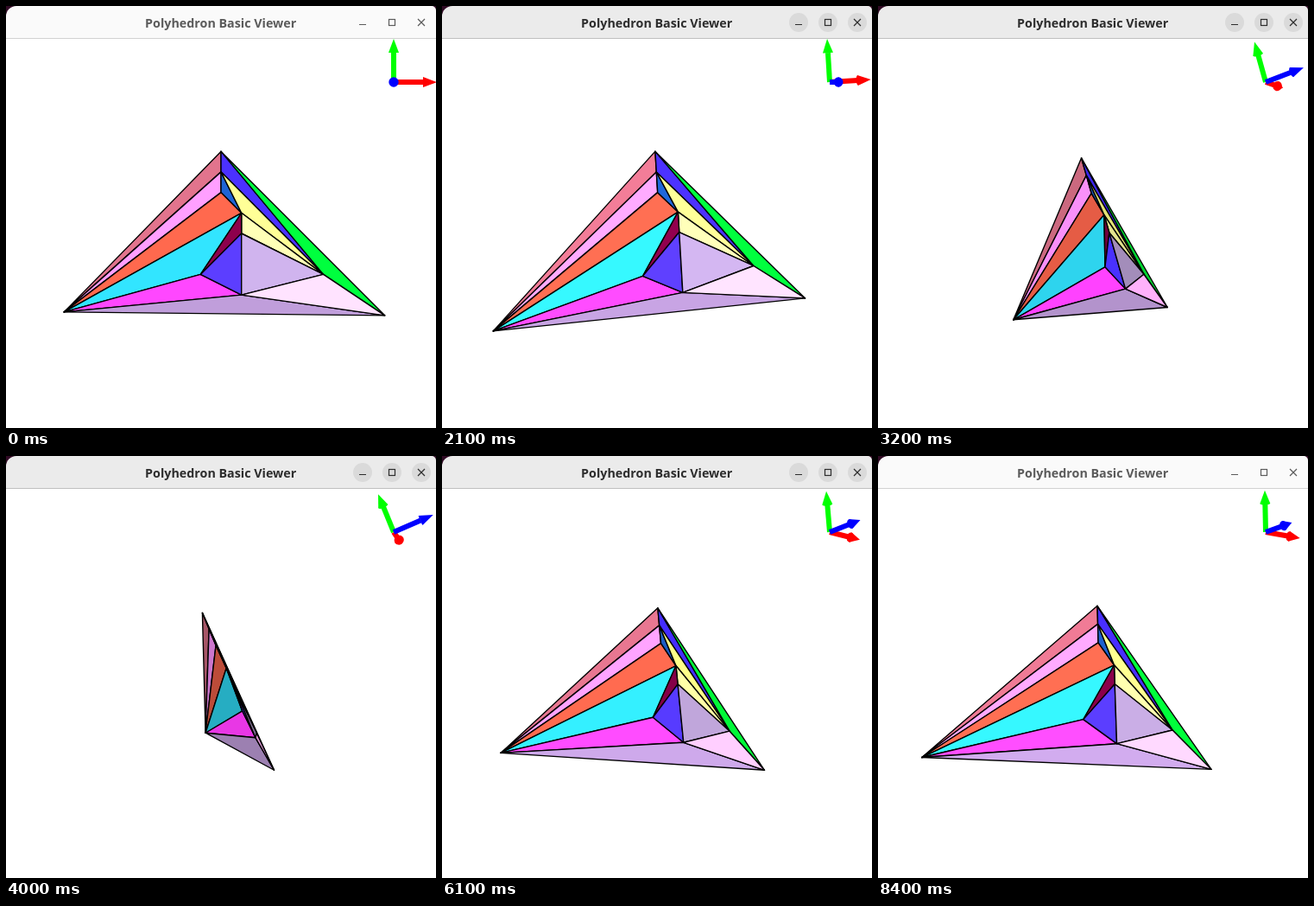
An HTML page with a canvas that plays this animation: 498x488 px, repeating every 8.5 s.

```html
<!DOCTYPE html>
<html lang="en">
<head>
<meta charset="utf-8">
<title>Polyhedron Basic Viewer</title>
<style>
html, body { margin: 0; width: 100%; height: 100%; overflow: hidden; background: #fff; }
canvas { display: block; }
</style>
</head>
<body>
<canvas id="view" width="498" height="488"></canvas>
<script>
const g = document.getElementById('view').getContext('2d');
const LOOP = 8500, STEP = 100;

// Camera: 45 degree field of view, fitted to the bounding sphere
const CX = 249, CY = 263;
const FOCAL = 225 / Math.tan(Math.PI / 8);
const DIST = Math.hypot(8, 4, .5) / Math.sin(Math.PI / 8);

// The sheet lies in the plane z = .5; only corner L drops to -.5
const sheet = {
  T: [0, 4], A: [0, 3], G: [0, 2], B: [1, 1], C: [1, 0],
  D: [1, -3], E: [-1, -2], F: [5, -2], L: [-8, -4], R: [8, -4]
};
const verts = {};
for (const n in sheet) verts[n] = [...sheet[n], n === 'L' ? -.5 : .5];

const GAIN = 1.35;
const faces = {
  TAL: '#ad596c', AGL: '#d37ad3', GBL: '#c44f3b', BEL: '#27b3c9', EDL: '#e937e6',
  DRL: '#9d81b3', TAF: '#3724de', TFR: '#00cc2e', AGB: '#164a9d', ABF: '#d7d76f',
  BCF: '#d7d787', BEC: '#680038', CED: '#442eed', CDF: '#9a85b0', DFR: '#fcaaf1'
};

// Drag poses: reached at, held until, then yaw, pitch and roll in degrees
const poses = [
  [0, 1400, 0, 0, 0],
  [1900, 2000, 13.5, .6, 2.7],
  [2100, 2100, 17.2, 1, 3.4],
  [2300, 2300, 31, 0, 6.9],
  [2600, 2800, 52.4, -8.4, 11.7],
  [3200, 3200, 69.6, -14.7, 15.6],
  [4000, 5200, 86.2, -18.7, 22.3],
  [5700, 5700, 68.5, -21.4, 14.1],
  [6100, 6100, 47, -18.7, 4.8],
  [6700, LOOP, 37.7, -15, 1.2]
];

const sub = (a, b) => a.map((v, i) => v - b[i]);
const dot = (a, b) => a.reduce((s, v, i) => s + v * b[i], 0);
const cross = (a, b) => [a[1] * b[2] - a[2] * b[1], a[2] * b[0] - a[0] * b[2], a[0] * b[1] - a[1] * b[0]];
const unit = a => a.map(v => v / Math.hypot(...a));
const spin = (x, y, a) => [x * Math.cos(a) - y * Math.sin(a), x * Math.sin(a) + y * Math.cos(a)];

function anglesAt(t) {
  const i = poses.findLastIndex(p => p[0] <= t);
  const a = poses[i], b = poses[i + 1] || a;
  const k = t > a[1] ? (t - a[1]) / (b[0] - a[1]) : 0;
  return [2, 3, 4].map(j => (a[j] + (b[j] - a[j]) * k) * Math.PI / 180);
}

// World to eye axes: x right, y up, z toward the viewer
function turn([x, y, z], [yaw, pitch, roll]) {
  [z, x] = spin(z, x, yaw);
  [y, z] = spin(y, z, pitch);
  [x, y] = spin(x, y, roll);
  return [x, y, z];
}

function poly(points) {
  g.beginPath();
  points.forEach(p => g.lineTo(...p));
  g.closePath();
}

// Headlight plus a weak fill light from the right
function shade(hex, [a, b, c]) {
  let n = unit(cross(sub(b, a), sub(c, a)));
  if (n[2] < 0) n = n.map(v => -v);
  const mid = a.map((v, i) => (v + b[i] + c[i]) / 3);
  const head = dot(n, unit(sub([0, 0, DIST], mid)));
  const light = GAIN * (.44 + .567 * Math.max(0, head) + .2 * n[0]);
  const rgb = [1, 3, 5].map(i => Math.min(255, Math.round(parseInt(hex.slice(i, i + 2), 16) * light)));
  return `rgb(${rgb})`;
}

function drawMesh(angles) {
  g.lineWidth = 1.4;
  g.lineJoin = 'round';
  g.strokeStyle = '#000';
  for (const names in faces) {
    const eye = [...names].map(n => turn(verts[n], angles));
    poly(eye.map(([x, y, z]) => {
      const s = FOCAL / (DIST - z);
      return [CX + s * x, CY - s * y];
    }));
    g.fillStyle = shade(faces[names], eye);
    g.fill();
    g.stroke();
  }
}

function drawAxes(angles) {
  const axes = ['#f00', '#0f0', '#00f'].map((color, i) =>
    ({ color, dir: turn([0, 1, 2].map(j => +(i === j)), angles) }));
  axes.sort((a, b) => a.dir[2] - b.dir[2]);
  for (const { color, dir: [x, y, z] } of axes) {
    const n = Math.hypot(x, y) || 1;
    const point = (along, side) => [449 + x * along + y / n * side, 88 - y * along + x / n * side];
    g.fillStyle = color;
    poly([point(0, -3), point(34, -3), point(34, 3), point(0, 3)]);
    g.fill();
    poly([point(34, -6), point(50, 0), point(34, 6)]);
    g.fill();
    g.beginPath();
    g.ellipse(...point(34, 0), 5.7 * Math.abs(z), 5.7, Math.atan2(-y, x), 0, 7);
    g.fill();
  }
}

function drawBar(active) {
  g.fillStyle = '#300a24';
  g.fillRect(0, 0, 498, 12);
  g.fillStyle = active ? '#ebebeb' : '#fafafa';
  g.beginPath();
  g.roundRect(0, 0, 498, 38, [12, 5, 0, 0]);
  g.fill();
  g.fillStyle = active ? '#bfbfbf' : '#d2d2d2';
  g.fillRect(0, 37, 498, 1);

  const ink = active ? '#2d2d2d' : '#5b5b5b';
  g.fillStyle = ink;
  g.font = '700 14.3px "Open Sans", "Noto Sans", sans-serif';
  g.textAlign = 'center';
  g.fillText('Polyhedron Basic Viewer', 248.7, 25);

  if (active) {
    g.fillStyle = '#dadada';
    for (const x of [413, 447, 481]) {
      g.beginPath();
      g.arc(x, 19, 11, 0, 7);
      g.fill();
    }
  }
  g.strokeStyle = ink;
  g.lineWidth = 1.2;
  g.lineJoin = 'miter';
  g.strokeRect(443.5, 15.5, 7, 7);
  g.beginPath();
  g.moveTo(409, 21.5); g.lineTo(417, 21.5);
  g.moveTo(477, 15); g.lineTo(485, 23);
  g.moveTo(485, 15); g.lineTo(477, 23);
  g.stroke();
}

const start = performance.now();
function frame() {
  const now = (performance.now() - start) % LOOP;
  const t = Math.floor(now / STEP) * STEP;
  const angles = anglesAt(t);
  g.fillStyle = '#fff';
  g.fillRect(0, 0, 498, 488);
  drawMesh(angles);
  drawAxes(angles);
  drawBar(t >= 1500 && t < 8400);
  requestAnimationFrame(frame);
}
frame();
</script>
</body>
</html>
```
